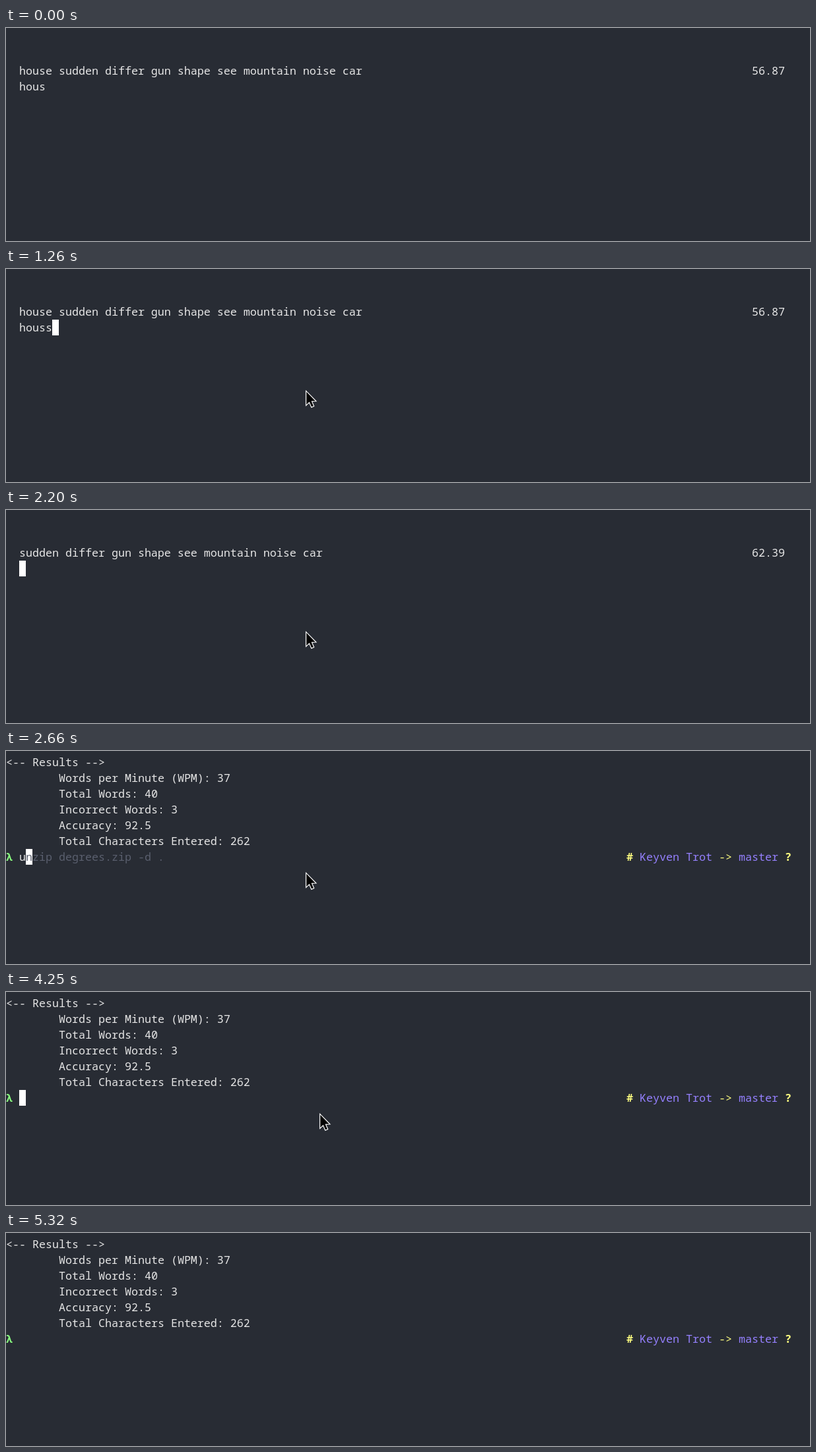
An HTML page for the animation above (5370 ms loop, 1218 px wide and 324 px high).

```html
<!DOCTYPE html>
<html lang="en">
<head>
<meta charset="utf-8">
<title>Terminal typing session</title>
<style>
  html, body { margin: 0; width: 100%; height: 100%; overflow: hidden; background: #282c34; }
  svg { display: block; }
  text {
    font: 500 16.667px "Noto Sans Mono", "DejaVu Sans Mono", monospace;
    font-variant-ligatures: none;
    white-space: pre;
    fill: #e6e6e6;
  }
  .bold { font-weight: 700; }
  .green { fill: #8aff80; }
  .yellow { fill: #ffff80; }
  .purple { fill: #9580ff; }
  .ghost { fill: #5a5f6e; }
</style>
</head>
<body>
<svg width="1218" height="324" viewBox="0 0 1218 324">
  <g id="game">
    <text id="words" x="20" y="71"></text>
    <text id="clock" x="1130" y="71"></text>
  </g>
  <g id="results">
    <text x="0" y="23">&lt;-- Results --&gt;</text>
    <text x="80" y="47">Words per Minute (WPM): 37</text>
    <text x="80" y="71">Total Words: 40</text>
    <text x="80" y="95">Incorrect Words: 3</text>
    <text x="80" y="119">Accuracy: 92.5</text>
    <text x="80" y="143">Total Characters Entered: 262</text>
  </g>
  <g id="prompt">
    <text class="green bold" x="0" y="167">λ</text>
    <text class="yellow bold" x="940" y="167">#</text>
    <text class="purple" x="960" y="167">Keyven Trot</text>
    <text class="yellow" x="1080" y="167">-&gt;</text>
    <text class="purple" x="1110" y="167">master</text>
    <text class="yellow bold" x="1180" y="167">?</text>
  </g>
  <rect id="block" width="10" height="24" fill="#fff"/>
  <text id="typed" x="20"></text>
  <text id="ghost" class="ghost" x="30" y="167">nzip degrees.zip -d .</text>
  <path id="mouse" d="M1.5 1.4V23.6L6.4 19L9.7 26.4L13.6 24.7L10.4 17.4L16.8 17Z"
        fill="#000" stroke="#fff" stroke-width="1.2"/>
</svg>
<script>
const LOOP = 5370;
const WORDS = "house sudden differ gun shape see mountain noise car";
const el = id => document.getElementById(id);
const [game, results, prompt_, words, clock, block, typed, ghost, mouse] =
  ["game", "results", "prompt", "words", "clock", "block", "typed", "ghost", "mouse"].map(el);

// start time, view, typed text, block visible
const steps = [
  [0, "first", "hous", false],
  [510, "first", "hous", true],
  [980, "first", "hous", false],
  [1210, "first", "hous", true],
  [1260, "first", "houss", true],
  [1730, "first", "hous", true],
  [1910, "first", "house", true],
  [2200, "second", "", true],
  [2480, "done", "", false],
  [2520, "shell", "", true],
  [2660, "shell", "u", true],
  [2700, "shell", "ud", true],
  [2920, "shell", "udd", true],
  [3340, "shell", "ud", true],
  [3570, "shell", "u", true],
  [3710, "shell", "", true],
  [4380, "shell", "", false],
  [4850, "shell", "", true],
  [5320, "shell", "", false]
];

const show = (node, on) => node.setAttribute("visibility", on ? "visible" : "hidden");

// Pointer position, or null while it is off stage
function pointer(t) {
  if (t < 80 || t >= 4330) return null;
  if (t < 280) {
    const left = 1 - Math.floor((t - 80) / 50) / 4;
    return [447 + 113 * left * left, 182 + 95 * left * left].map(Math.round);
  }
  if (t < 560) return [447, 182];
  if (t < 610) return [450, 183];
  if (t < 4250) return [453, 184];
  return [t < 4280 ? 474 : 491, 184];
}

function draw(t) {
  const [, view, text, on] = steps.findLast(s => s[0] <= t);
  const playing = view === "first" || view === "second";
  const top = playing ? 77 : 149;

  show(game, playing);
  show(results, !playing);
  show(prompt_, view === "shell");
  words.textContent = view === "first" ? WORDS : WORDS.slice(6);
  clock.textContent = view === "first" ? "56.87" : "62.39";

  typed.textContent = text;
  typed.setAttribute("y", top + 18);
  block.setAttribute("x", 20 + 10 * text.length);
  block.setAttribute("y", top);
  show(block, on);
  show(ghost, view === "shell" && text === "u");

  const at = pointer(t);
  show(mouse, at);
  if (at) mouse.setAttribute("transform", `translate(${at})`);
}

const start = performance.now();
function tick() {
  draw((performance.now() - start) % LOOP);
  requestAnimationFrame(tick);
}
tick();
</script>
</body>
</html>
```
